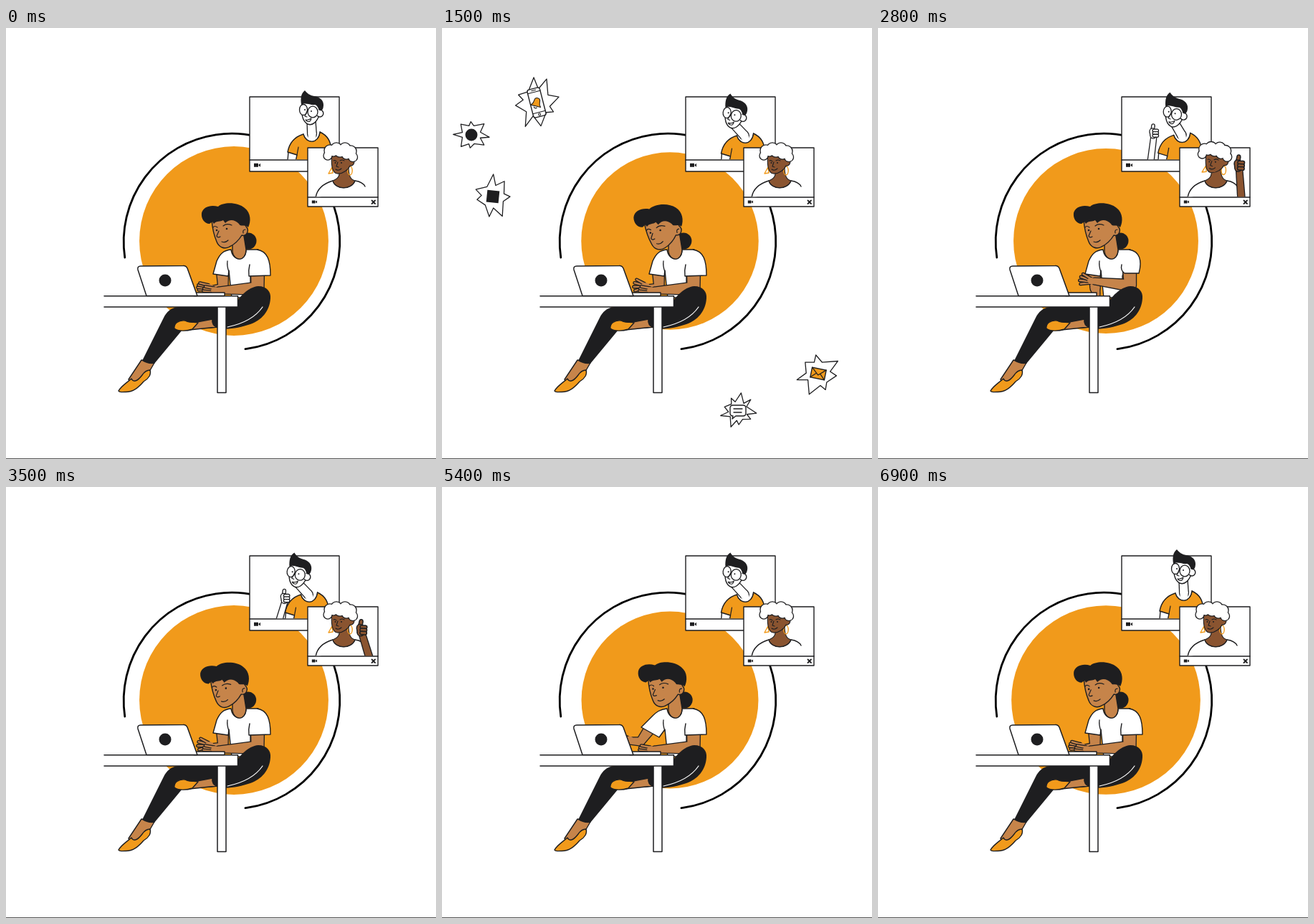
An HTML page with a canvas for the animation above (7 s loop, 600 by 601 pixels).

```html
<!DOCTYPE html>
<html lang="en">
<head>
<meta charset="utf-8">
<title>Video call</title>
<style>
html, body { margin: 0; width: 100%; height: 100%; overflow: hidden; background: #fff; }
canvas { display: block; width: 600px; height: 601px; }
</style>
</head>
<body>
<canvas id="stage" width="600" height="601"></canvas>
<script>
const ctx = document.getElementById('stage').getContext('2d');
const LOOP = 7000, TAU = Math.PI * 2;
const INK = '#1e1e20', ORANGE = '#f19a1b', SKIN = '#c6844a', BROWN = '#8a5430', WHITE = '#fff';

const clamp = v => Math.max(0, Math.min(1, v));
const mix = (a, b, k) => Array.isArray(a) ? a.map((v, i) => mix(v, b[i], k)) : a + (b - a) * k;

// Eased value at time t from [time, value] pairs.
function keyed(t, ...keys) {
  if (t <= keys[0][0]) return keys[0][1];
  for (let i = 1; i < keys.length; i++) {
    const [t0, a] = keys[i - 1], [t1, b] = keys[i];
    if (t <= t1) {
      const u = (t - t0) / (t1 - t0);
      return mix(a, b, u * u * (3 - 2 * u));
    }
  }
  return keys[keys.length - 1][1];
}

function paint(path, fill, stroke = INK, width = 1.4) {
  if (fill) { ctx.fillStyle = fill; ctx.fill(path); }
  if (stroke) { ctx.strokeStyle = stroke; ctx.lineWidth = width; ctx.stroke(path); }
}
const shape = (d, fill, stroke, width) => paint(new Path2D(d), fill, stroke, width);
const line = (d, width = 1.3, color = INK) => shape(d, null, color, width);

function oval(x, y, rx, ry, fill, stroke, width) {
  const p = new Path2D();
  p.ellipse(x, y, rx, ry, 0, 0, TAU);
  paint(p, fill, stroke, width);
}
const dot = (x, y, r, color = INK) => oval(x, y, r, r, color, null);

function box(x, y, w, h, fill, stroke, width, r = 0) {
  const p = new Path2D();
  p.roundRect(x, y, w, h, r);
  paint(p, fill, stroke, width);
}

function group(x, y, angle, draw, scale = 1) {
  ctx.save();
  ctx.translate(x, y);
  ctx.rotate(angle);
  ctx.scale(scale, scale);
  draw();
  ctx.restore();
}
// Moves artwork by (dx, dy) and turns it about its own pivot.
const turned = (px, py, dx, dy, angle, draw) =>
  group(px + dx, py + dy, angle, () => { ctx.translate(-px, -py); draw(); });

// Outlined union of circles [x, y, r]; neighbours are joined unless loose.
function limb(joints, fill, loose) {
  for (const [grow, color] of [[0.7, INK], [-0.6, fill]]) {
    ctx.fillStyle = color;
    joints.forEach(([x, y, r], i) => {
      ctx.beginPath();
      ctx.arc(x, y, r + grow, 0, TAU);
      ctx.fill();
      if (!i || loose) return;
      const [x0, y0, r0] = joints[i - 1];
      const d = Math.hypot(x - x0, y - y0) || 1;
      const nx = (y0 - y) / d, ny = (x - x0) / d, a = r0 + grow, b = r + grow;
      ctx.beginPath();
      ctx.moveTo(x0 + nx * a, y0 + ny * a);
      ctx.lineTo(x + nx * b, y + ny * b);
      ctx.lineTo(x - nx * b, y - ny * b);
      ctx.lineTo(x0 - nx * a, y0 - ny * a);
      ctx.fill();
    });
  }
}

function hand(x, y, angle, spread) {
  group(x, y, angle, () => {
    for (let i = 0; i < 4; i++) {
      const a = (i - 1.5) * spread, len = 15 - Math.abs(i - 1.3) * 1.6;
      const base = (i - 1.5) * 2;
      limb([[3, base, 2], [3 + Math.cos(a) * len, base + Math.sin(a) * len, 1.7]], SKIN);
    }
    oval(1, 0, 6, 4.6, SKIN, null);
  });
}

function thumbsUp(x, y, footX, footY, fill, size, lean) {
  limb([[footX, footY, 4.5 * size], [x, y + 4, 4 * size]], fill);
  group(x, y, lean, () => {
    limb([[-2, -2, 2.6], [-1, -10, 2]], fill);
    limb([[-2, -2, 4], [-1, 4, 4]], fill);
    for (let i = 0; i < 3; i++) limb([[0, -3 + i * 3.6, 1.9], [4.5, -3 + i * 3.6, 1.9]], fill);
  }, size);
}

function star(radius, points, seed) {
  const p = new Path2D();
  for (let i = 0; i < points * 2; i++) {
    const r = radius * (i % 2 ? 0.58 : 0.97 + 0.16 * Math.sin(i * 2.3 + seed));
    const a = (i + 0.35 * Math.sin(i * 1.7 + seed)) * Math.PI / points;
    p.lineTo(r * Math.cos(a), r * Math.sin(a));
  }
  p.closePath();
  paint(p, WHITE, INK, 1.3);
}

function phone() {
  box(-9, -20, 18, 40, WHITE, INK, 1.4, 3);
  line('M-9 -15H9M-9 14H9M-3 -17.5H3', 1.1);
  oval(0, 17, 1.5, 1.5, WHITE, INK, 1);
  group(0, 0, 0.5, () => {
    shape('M-7 5Q-4 2 -4 -2C-4 -8 4 -8 4 -2Q4 2 7 5Z', ORANGE, INK, 1.1);
    line('M-2 7Q0 9 2 7');
  });
}
function mail() {
  box(-10, -7, 20, 14, ORANGE, INK, 1.4);
  line('M-10 -7L0 2L10 -7M-10 7L-3 0M10 7L3 0', 1.2);
}
function chat() {
  shape('M-7 -8H7Q11 -8 11 -4V3Q11 7 7 7H-3L-8 11L-7 7Q-11 7 -11 3V-4Q-11 -8 -7 -8Z', WHITE);
  line('M-6 -3H6M-6 2H5');
}

const notices = [
  { x: 132, y: 104, r: 33, n: 8, angle: -0.25, pop: 900, go: 1738, draw: phone },
  { x: 41, y: 149, r: 22.5, n: 8, angle: 0, pop: 1000, go: 1587, draw: () => dot(0, 0, 8.5) },
  { x: 71, y: 235, r: 27.5, n: 7, angle: 0.1, pop: 1050, go: 1608, draw: () => box(-8.5, -8.5, 17, 17, INK, null) },
  { x: 525, y: 482, r: 29, n: 7, angle: 0.2, pop: 950, go: 1650, draw: mail },
  { x: 413, y: 534, r: 23, n: 9, angle: 0, pop: 1050, go: 1713, draw: chat }
];

function drawNotices(t) {
  notices.forEach((s, i) => {
    const grow = clamp((t - s.pop) / 400), u = clamp((t - s.go) / 700);
    if (!grow || u === 1) return;
    const back = grow - 1, p = u * u;
    const size = (1 + 2.7 * back ** 3 + 1.7 * back ** 2) * (1 - clamp((p - 0.4) / 0.6));
    group(mix(s.x, 318, p), mix(s.y, 297, p), s.angle + 1.2 * p, () => {
      star(s.r, s.n, i * 1.9);
      s.draw();
    }, size);
  });
}

function frame(x, y, w, h, bar) {
  box(x, y, w, h, WHITE, INK, 1.4);
  line(`M${x} ${bar}H${x + w}`, 1.4);
}
function camera(x, y, s) {
  group(x, y, 0, () => shape('M-4 -2.5H2V2.5H-4ZM2.6 -.5L5 -2.5V2.5L2.6 .5Z', INK, null), s);
}
function clipped(x, y, w, h, draw) {
  ctx.save();
  ctx.beginPath();
  ctx.rect(x, y, w, h);
  ctx.clip();
  draw();
  ctx.restore();
}

function man(t) {
  const lean = keyed(t, [100, 0], [800, 1], [2450, 1], [2800, 0.65], [3250, 1], [5700, 1], [6500, 0], [7000, 0]);
  const raised = keyed(t, [2350, [384, 205]], [2750, [385, 146]], [3200, [386, 146]],
    [3600, [390, 156]], [4300, [390, 156]], [4700, [384, 205]]);
  frame(340, 96, 125, 104, 184);
  camera(350, 191.3, 1);
  clipped(341, 60, 123.3, 123.3, () => {
    ctx.save();
    ctx.translate(-3.5 * lean, 2 * lean);
    shape('M394 172L393 186H406L407 172Z', WHITE);
    shape('M415 148C405 151 396 157 393 173L406 177L404 186H454V172C454 157 447 149 438 145C436 162 419 162 415 148Z', ORANGE);
    line('M408 166L406 177', 1.2);
    shape('M415 148C419 162 436 162 438 145L431 146L420 148Z', WHITE, null);
    line('M415 148C419 162 436 162 438 145');
    ctx.restore();
    limb([[426 - 18 * lean, 130 + 5 * lean, 6], [427 - 5 * lean, 148 + 2 * lean, 6.3]], WHITE);
    oval(427 - 4 * lean, 151 + 2 * lean, 5.5, 5, WHITE, null);
    turned(425, 140, -20 * lean, 5 * lean, 0.1 * lean, () => {
      shape('M414 104C411 117 413 130 421 134C428 137 434 130 437 122L437 106Z', WHITE);
      oval(438, 119, 4.8, 5, WHITE);
      oval(435.5, 118, 3, 4, WHITE, null);
      shape('M412 107C411 98 411 92 417 87C420 91 424 94 430 95C438 96 443 101 443 107C443 113 441 116 438 115C435 112 435 108 431 107C425 108 418 103 412 107Z', INK, null);
      oval(415, 114, 5.5, 7.5, WHITE, INK, 1.3);
      oval(428, 117, 7, 7.8, WHITE, INK, 1.3);
      dot(417, 114, 1);
      dot(426, 116, 1);
      line('M420 116L417 123L420 124M418 128Q422 129 426 126Q425 132 420 130Z', 1.1);
    });
    if (raised[1] < 200) thumbsUp(raised[0], raised[1], 380, 190, WHITE, 1, 0);
  });
}

function guest(t) {
  const nod = keyed(t, [2400, 0], [2750, 1], [3100, 1], [3500, 0]);
  const raised = keyed(t, [2350, [506, 255]], [2750, [504, 191]], [3200, [503, 191]],
    [3600, [495, 200]], [4300, [495, 200]], [4700, [506, 255]]);
  frame(421, 167, 98, 82, 236);
  camera(430, 242.5, 0.8);
  line('M510.5 240.5L515 245M515 240.5L510.5 245', 1.8);
  clipped(422, 150, 96.3, 85.3, () => {
    shape('M432 237C434 222 446 216 456 213C460 226 482 226 487 213C494 214 499 217 501 221', WHITE);
    shape('M465 197C466 206 464 210 456 213C460 226 482 226 487 213C479 211 478 203 478 192Z', BROWN, INK, 1.1);
    turned(471, 205, 2 * nod, -nod, 0.05 * nod, () => {
      line('M455 194L450 203L456 202Z', 1.4, ORANGE);
      oval(480, 199, 3.2, 6, null, ORANGE, 1.4);
      shape('M455 174C453 190 455 202 462 203C470 204 478 197 480 192C485 193 488 186 484 183L479 172Z', BROWN, INK, 1.1);
      limb([[452, 171, 8], [461, 168, 8], [473, 168, 8], [481, 172, 8], [484, 180, 6.5],
        [449, 178, 6], [466, 172, 8], [475, 176, 7], [457, 173, 6]], WHITE, true);
      line('M457 185Q459 184 461 186M466 185Q469 183 472 185M463 187L461 193L464 194M460 197Q464 200 468 196', 1.1);
      dot(459.5, 188, 1);
      dot(468, 188, 1);
    });
    if (raised[1] < 245) thumbsUp(raised[0], raised[1], 507, 238, BROWN, 1.15, 0.05);
  });
}

function head(angle) {
  turned(325, 312, 0, 0, angle, () => {
    shape('M287 268C288 280 291 291 294 298C297 306 305 309 312 305C320 301 326 294 329 289C336 291 340 282 335 277L328 264Z', SKIN);
    shape('M284 273C277 273 272 266 273 258C275 249 286 246 296 249C304 242 324 243 333 251C342 258 342 270 338 278C333 273 327 278 325 273C318 266 311 267 306 272L303 268C299 271 294 268 290 273L288 270Z', INK, null);
    line('M289 278Q291 275 295 278M303 276Q308 272 315 275M297 283L294 290Q295 293 299 291M301 298Q306 300 310 296M334 281Q330 281 331 286', 1.2);
    dot(294, 282, 1.3);
    dot(308, 280, 1.3);
  });
}

function host(t) {
  const tilt = keyed(t, [0, 0], [600, -0.04], [1400, -0.11], [1600, -0.11], [1950, 0.09], [2300, 0.09],
    [2800, 0], [4200, -0.07], [5100, 0.015], [5700, 0.015], [6300, 0], [6700, 0.015], [7000, 0]);
  const raise = keyed(t, [1600, 0], [1950, 1], [2350, 1], [2800, 0], [3200, 0]);
  const lift = keyed(t, [2350, 0], [2800, 1], [3200, 0]);
  const reach = keyed(t, [4800, 0], [5250, 1], [5600, 1], [6100, 0]);
  const still = Math.max(raise, lift);
  const tap = (1 - Math.cos(TAU * t / 1000)) * (1 - still);

  dot(338 + tilt * 10, 297, 11.5);

  // Far arm
  const elbow = mix([303, 363, 7], [277, 355, 6], reach);
  const wrist = mix(mix([285, 364 - tap, 4], [305, 371, 5], still), [262, 354, 5], reach);
  limb([mix([302, 340, 8.5], [290, 337, 8], reach), elbow, wrist], SKIN);

  // Shirt
  const [hemX, hemY, endX, endY] = mix([289, 343, 310, 346], [278, 335, 303, 349], reach);
  shape(`M314 309C304 310 299 314 294 ${325 - reach * 6}L${hemX} ${hemY}L${endX} ${endY}L311 338L315 376H341V346L352 309H335C335 326 316 326 314 309Z`, WHITE);
  line('M309 325Q308 332 311 340', 1.3);
  shape('M316 292L316 312C318 326 335 326 335 309L331 284Z', SKIN);
  head(tilt);

  if (still < 0.4) hand(wrist[0], wrist[1] - 2, mix(3.25, 3.05, reach), 0.1 + tap * 0.08);

  // Near arm
  const pick = (rest, up, out) => mix(mix(rest, up, raise), out, lift * (1 - raise));
  const bend = pick([351, 363, 9], [355, 352, 8], [352, 359, 8.5]);
  const grip = pick([296, 366, 4.8], [316, 324, 4.8], [302, 353, 4.8]);
  const aim = pick(3.2, 3.75, 3.35);
  limb([[351, 338, 9.5], bend, grip], SKIN);
  hand(grip[0] - 3, grip[1] - raise * 3, aim, 0.08 + 0.14 * still);
  const [sx, sy, ex, ey] = pick([369, 345, 339, 346], [366, 343, 345, 336], [364, 342, 344, 342]);
  shape(`M350 309C365 311 ${369 + raise * 3} 324 ${sx} ${sy}L${ex} ${ey}Q338 338 340 330`, WHITE);
  ctx.fillStyle = WHITE;
  ctx.fillRect(338, 310, 12, 18);
}

function legs() {
  shape('M189 463L171 490L174 498L196 486L207 467Z', SKIN);
  shape('M157 506C160 500 168 495 175 489C178 495 184 492 190 484C194 478 198 477 201 477C203 483 199 489 192 493C186 500 178 508 166 507.5Q157 508 157 506Z', ORANGE);
  shape('M300 385L240 389C230 390 224 396 220 404L190 464Q197 469 207 468L246 421L294 418C306 422 326 418 341 413C356 408 368 395 369 377C370 368 364 360 352 360C338 361 324 376 320 386Z', INK, null);
  shape('M256 412L288 406C287 412 290 416 294 417L256 421Z', SKIN);
  shape('M235 419C234 412 241 407 250 408C256 412 262 409 268 411L260 420C252 423 240 423 235 419Z', ORANGE);
  line('M309 417C328 413 347 405 358 389', 1.2, WHITE);
}

function desk() {
  box(295, 388, 12, 120.5, WHITE, INK, 1.5);
  box(137, 374, 186, 15, WHITE, null);
  line('M137 373.7H323.5V389H137', 1.5);
  shape('M262 369H305V373.5H262Z', WHITE);
  shape('M196 373.5L184 337Q183 332 188 332L247 331.5Q251 331 253 335L267 373.5Z', WHITE, INK, 1.5);
  dot(222, 352, 8.5);
}

function render(t) {
  ctx.fillStyle = WHITE;
  ctx.fillRect(0, 0, 600, 601);
  ctx.lineJoin = ctx.lineCap = 'round';
  drawNotices(t);
  dot(318, 297, 127.6 + 4.3 * Math.cos(TAU * t / 3500), ORANGE);
  const ring = new Path2D();
  ring.arc(315, 298, 150.8, 2.995, TAU + 1.445);
  paint(ring, null, '#000', 2.8);
  man(t);
  guest(t);
  host(t);
  legs();
  desk();
  ctx.fillStyle = '#555';
  ctx.fillRect(0, 600, 600, 1);
}

const start = performance.now();
function tick() {
  render((performance.now() - start) % LOOP);
  requestAnimationFrame(tick);
}
tick();
</script>
</body>
</html>
```
